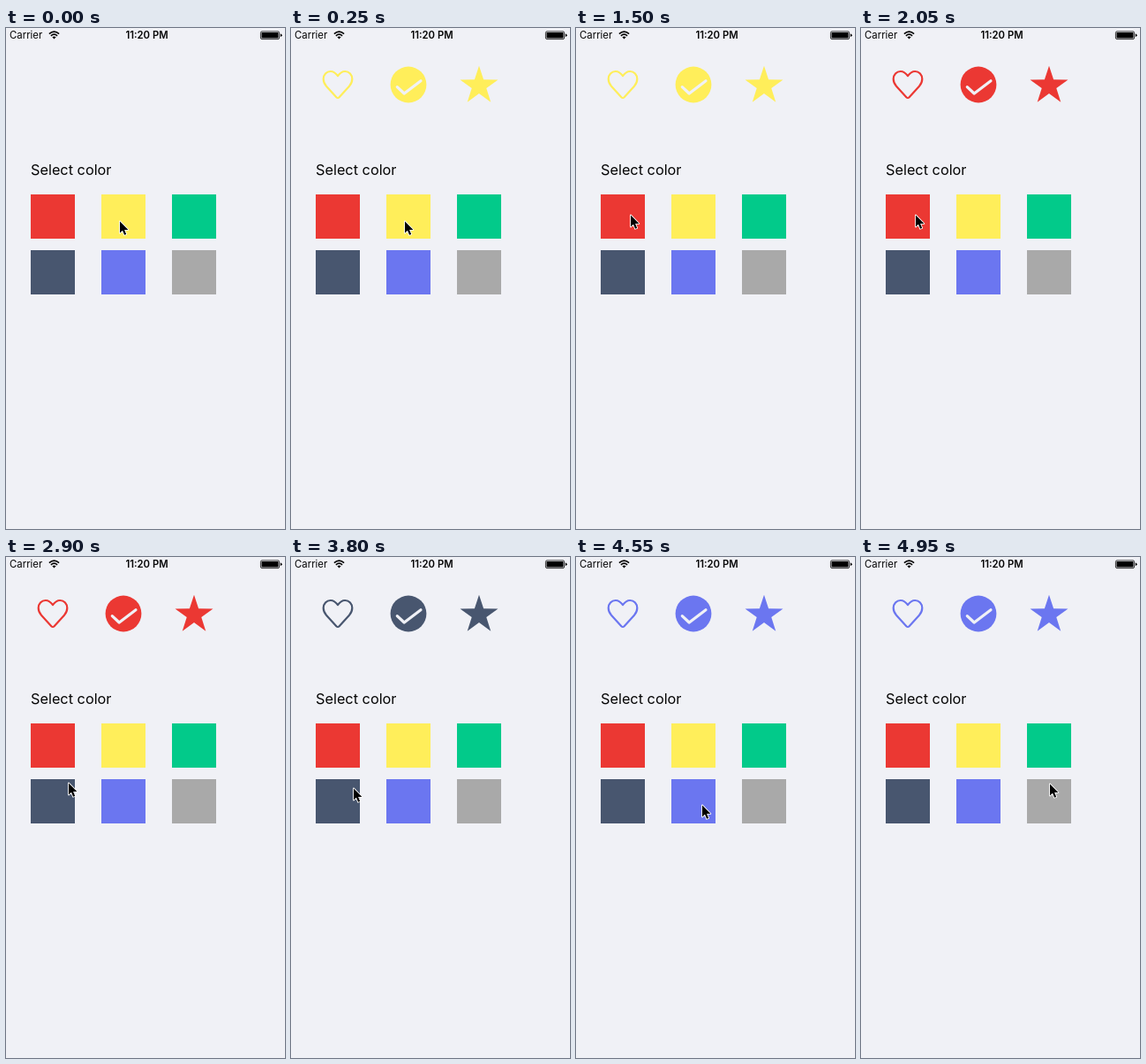
Animation, 316 px wide and 566 px high, one loop 5050 ms. Source, as an HTML page:

```html
<!DOCTYPE html>
<html lang="en">
<head>
<meta charset="utf-8">
<title>Select color</title>
<style>
  html, body { margin: 0; width: 100%; height: 100%; overflow: hidden; background: #f0f1f6; }
  svg { display: block; width: 316px; height: 566px; }
  text { font-family: Inter, sans-serif; fill: #050505; }
  .line { fill: none; stroke-linecap: round; stroke-linejoin: round; }
</style>
</head>
<body>
<svg viewBox="0 0 316 566">
  <g id="status">
    <text x="4" y="12.4" font-size="11.4">Carrier</text>
    <g class="line" stroke="#050505" stroke-width="1.7" style="stroke-linecap:butt">
      <path d="M48.9 6.6Q54.5 1.6 60.1 6.6"/>
      <path d="M50.9 8.8Q54.5 5.6 58.1 8.8"/>
    </g>
    <path d="M52.4 10.2Q54.5 8.6 56.6 10.2L54.5 12.4Z"/>
    <text x="159.5" y="12.4" font-size="11.3" font-weight="600" text-anchor="middle">11:20 PM</text>
    <rect x="288.4" y="3.9" width="21.2" height="8.7" rx="1.6" fill="none" stroke="#050505" stroke-width=".8"/>
    <rect x="289.5" y="5" width="19" height="6.5" rx=".6"/>
    <path d="M310.8 6.6Q312.6 7 312.6 8.2T310.8 9.9Z"/>
  </g>

  <g id="icons">
    <path class="line" stroke="currentColor" stroke-width="2.2"
      d="M53 54.2C50.5 50.6 47.8 49 44.8 49C40.2 49 36.7 52.8 36.7 57.6C36.7 61 38 63.6 40 65.8L51.4 78.2Q53 79.8 54.6 78.2L66 65.8C68 63.6 69.3 61 69.3 57.6C69.3 52.8 65.8 49 61.2 49C58.2 49 55.5 50.6 53 54.2Z"/>
    <circle cx="133" cy="64" r="20.4" fill="currentColor"/>
    <path class="line" stroke="#f0f1f6" stroke-width="3.2" d="M120.3 66.6L128.2 74L147 59.8"/>
    <polygon id="star" fill="currentColor"/>
  </g>

  <text x="28" y="165.6" font-size="16.3">Select color</text>
  <g id="swatches"></g>

  <path id="cursor" d="M1 1.4V14.6L4 11.8L6.1 16.8L8.2 15.9L6.1 11H10.4Z"
    stroke="#fff" stroke-width="1.7" stroke-linejoin="round" paint-order="stroke"/>
</svg>
<script>
const LOOP = 5050, TICK = 50;
const BG = [240, 241, 246], RED = [235, 56, 51], YELLOW = [255, 238, 90],
      GREEN = [2, 202, 138], NAVY = [72, 86, 111], VIOLET = [107, 118, 240], GREY = [169, 169, 169];

const $ = id => document.getElementById(id);
const rgb = c => `rgb(${c.map(Math.round)})`;
const linear = p => p;
const ease = p => p * p * (3 - 2 * p);

// [time, value, easing towards this value]
const tints = [
  [0, BG], [250, YELLOW, ease],
  [1750, YELLOW], [2050, RED, ease],
  [3150, RED], [3450, NAVY, ease],
  [4250, NAVY], [4550, VIOLET, ease]
];
const moves = [
  [850, [128, 217]], [950, [116, 219], ease], [1050, [90, 217], linear],
  [1200, [68, 212], linear], [1350, [61, 210], linear],
  [2700, [61, 210]], [2800, [64, 228], ease], [2900, [70, 254], linear], [3050, [70, 260], linear],
  [3800, [70, 260]], [4150, [142, 279], ease],
  [4550, [142, 279]], [4950, [213, 255], ease]
];

function sample(track, t) {
  const i = track.findIndex(k => k[0] > t);
  if (i === 0) return track[0][1];
  if (i < 0) return track[track.length - 1][1];
  const [t0, a] = track[i - 1], [t1, b, fn = linear] = track[i];
  const p = fn((t - t0) / (t1 - t0));
  return a.map((v, n) => v + (b[n] - v) * p);
}

$('star').setAttribute('points', Array.from({ length: 10 }, (_, i) => {
  const r = i % 2 ? 8.7 : 22.6, a = i * Math.PI / 5;
  return [213 + r * Math.sin(a), 65.4 - r * Math.cos(a)].map(v => v.toFixed(2));
}).join(' '));

$('swatches').innerHTML = [RED, YELLOW, GREEN, NAVY, VIOLET, GREY].map((c, i) =>
  `<rect x="${28 + i % 3 * 80}" y="${i < 3 ? 188 : 251}" width="50" height="50" fill="${rgb(c)}"/>`).join('');

function draw(time) {
  const t = Math.floor(time % LOOP / TICK) * TICK;
  $('icons').style.visibility = t ? 'visible' : 'hidden';
  $('icons').style.color = rgb(sample(tints, t));
  $('cursor').setAttribute('transform', `translate(${sample(moves, t).map(Math.round)})`);
}

const start = performance.now();
function tick() {
  draw(performance.now() - start);
  requestAnimationFrame(tick);
}
tick();
</script>
</body>
</html>
```
